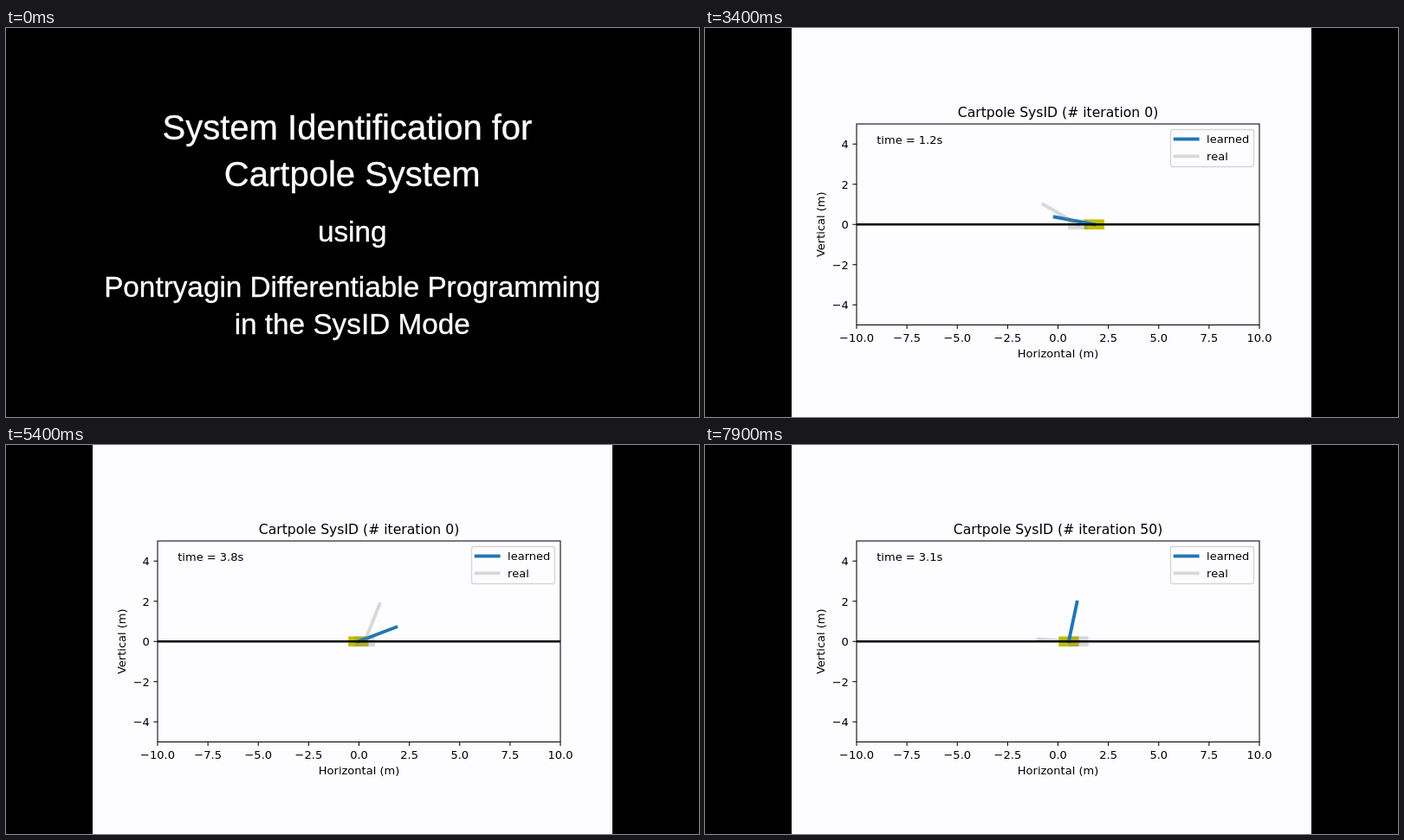
Recreate the animation shown at these times as an HTML page with a canvas. Size 800x450 px, loop 8 s.

```html
<!DOCTYPE html>
<html lang="en">
<head>
<meta charset="utf-8">
<title>Cartpole system identification</title>
<style>
  html, body { margin: 0; width: 100%; height: 100%; overflow: hidden; background: #000; }
  canvas { display: block; width: 800px; height: 450px; }
</style>
</head>
<body>
<canvas id="stage" width="800" height="450"></canvas>
<script>
const ctx = document.getElementById('stage').getContext('2d');
const LOOP = 8000, TRAINING_AT = 500, PLOT_AT = 2500, STEP = 100;
const SAMPLES_PER_STEP = 1.32, SAMPLES_PER_RUN = 40;
const UNIT = 23.25, MID_X = 407.5, MID_Y = 227.25;
const AXES = { left: 175, top: 111, width: 465, height: 232.5 };
const PAPER = '#fdfdff', BLUE = '#2176b6', YELLOW = '#bfbf00', GRAY = 'rgba(128,128,128,0.3)';
const SANS = '"Liberation Sans", Arial, sans-serif', PLOT = '"DejaVu Sans", sans-serif';
const LABEL = 13.02, TITLE = 15.63;
const HEADING = 40, BODY = 33.3;

// rate, slowing: swing phase; growth: amplitude gain in degrees per second;
// reach: cart travel against the pole; drift: slow sway of the whole system.
const real = { rate: 2.878, slowing: 0.2, growth: 25, reach: 0.5, drift: 0.07, spinAt: 1.884 };
const learnedRuns = [
  { rate: 2.607, slowing: 0.2056, growth: 13.1, reach: 0.8175, drift: 0.202 },
  { rate: 2.815, slowing: 0.254, growth: 25.2, reach: 0.579, drift: 0.3145 }
];

const radians = degrees => degrees * Math.PI / 180;

// Angle from hanging down: a growing swing, then full turns that are fastest at the bottom.
function poleAngle({ rate, slowing, growth, spinAt = Infinity }, t) {
  if (t > spinAt) {
    const turn = radians(250 * (t - spinAt));
    return turn + radians(45) * Math.sin(turn);
  }
  return radians(90 + growth * t) * Math.cos(rate * t - slowing * t * t);
}

function pose(system, t) {
  const q = poleAngle(system, t);
  const sway = system.drift * Math.sin(Math.PI * t / 3.35);
  const x = MID_X + UNIT * (system.reach * (1 - Math.sin(q)) + sway);
  return { x, tipX: x + 2 * UNIT * Math.sin(q), tipY: MID_Y + 2 * UNIT * Math.cos(q) };
}

function text(str, x, y, size, family = PLOT, align = 'center') {
  ctx.font = `${size}px ${family}`;
  ctx.textAlign = align;
  ctx.fillText(str, x, y);
}

function caption(str, x, y, size) {
  ctx.fillStyle = ctx.strokeStyle = '#fff';
  ctx.lineWidth = 0.35;
  text(str, x, y, size, SANS);
  ctx.strokeText(str, x, y);
}

function line(x1, y1, x2, y2, width, color, cap = 'butt') {
  ctx.lineWidth = width;
  ctx.strokeStyle = color;
  ctx.lineCap = cap;
  ctx.beginPath();
  ctx.moveTo(x1, y1);
  ctx.lineTo(x2, y2);
  ctx.stroke();
}

function drawCart(p, color) {
  ctx.fillStyle = color;
  ctx.fillRect(p.x - UNIT / 2, MID_Y - UNIT / 4, UNIT, UNIT / 2);
}

function drawPole(p, color) {
  line(p.x, MID_Y, p.tipX, p.tipY, 3.9, color, 'square');
}

function drawAxes() {
  const { left, top, width, height } = AXES, bottom = top + height;
  const signed = label => label.replace('-', '\u2212');
  ctx.fillStyle = '#000';
  for (let v = -10; v <= 10; v += 2.5) {
    const x = MID_X + v * UNIT;
    line(x, bottom, x, bottom + 4.6, 1.04, '#000');
    text(signed(v.toFixed(1)), x, 362.8, LABEL);
  }
  for (let v = -4; v <= 4; v += 2) {
    const y = MID_Y - v * UNIT;
    line(left - 4.6, y, left, y, 1.04, '#000');
    text(signed(String(v)), left - 9.1, y + 4.9, LABEL, PLOT, 'right');
  }
  ctx.strokeRect(left, top, width, height);
  text('Horizontal (m)', MID_X, 381.3, LABEL);
  ctx.save();
  ctx.translate(138.3, MID_Y);
  ctx.rotate(-Math.PI / 2);
  text('Vertical (m)', 0, 0, LABEL);
  ctx.restore();
}

function drawLegendEntry(name, color, y) {
  line(542.7, y, 568.7, y, 3.9, color, 'square');
  ctx.fillStyle = '#000';
  text(name, 579.1, y + 4.6, LABEL, PLOT, 'left');
}

function drawLegend() {
  ctx.beginPath();
  ctx.roundRect(537.5, 117.5, 96, 43, 2.6);
  ctx.fillStyle = PAPER;
  ctx.fill();
  ctx.lineWidth = 1.3;
  ctx.strokeStyle = 'rgba(204,204,204,0.8)';
  ctx.stroke();
  drawLegendEntry('learned', BLUE, 128.5);
  drawLegendEntry('real', GRAY, 148.3);
}

function drawPlot(step) {
  const sample = Math.floor(step * SAMPLES_PER_STEP + 0.2);
  const run = Math.floor(sample / SAMPLES_PER_RUN);
  const time = sample % SAMPLES_PER_RUN / 10;
  const learnedPose = pose(learnedRuns[run], time), realPose = pose(real, time);

  ctx.fillStyle = PAPER;
  ctx.fillRect(100, 0, 600, 450);
  drawCart(learnedPose, YELLOW);
  drawCart(realPose, GRAY);
  drawPole(learnedPose, BLUE);
  drawPole(realPose, GRAY);
  line(AXES.left, MID_Y, AXES.left + AXES.width, MID_Y, 2.6, '#000');
  drawAxes();
  drawLegend();
  ctx.fillStyle = '#000';
  text(`Cartpole SysID (# iteration ${run * 50})`, MID_X, 103.2, TITLE);
  text(`time = ${time.toFixed(1)}s`, 198.25, 134.25, LABEL, PLOT, 'left');
}

function drawIntro() {
  caption('System Identification for', 394, 129, HEADING);
  caption('Cartpole System', 399.7, 183, HEADING);
  caption('using', 399.7, 246.5, BODY);
  caption('Pontryagin Differentiable Programming', 399.7, 311.3, BODY);
  caption('in the SysID Mode', 399.7, 353.5, BODY);
}

function drawTraining() {
  caption('Training:', 399.7, 160.3, 45);
  caption('Learn the dynamics model from', 399.7, 234, BODY);
  caption('the input-output data of a real system', 399.7, 275.8, BODY);
}

const start = performance.now();

function render() {
  const t = Math.max(0, performance.now() - start) % LOOP;
  ctx.fillStyle = '#000';
  ctx.fillRect(0, 0, 800, 450);
  if (t < TRAINING_AT) drawIntro();
  else if (t < PLOT_AT) drawTraining();
  else drawPlot(Math.floor((t - PLOT_AT) / STEP));
  requestAnimationFrame(render);
}
render();
</script>
</body>
</html>
```
